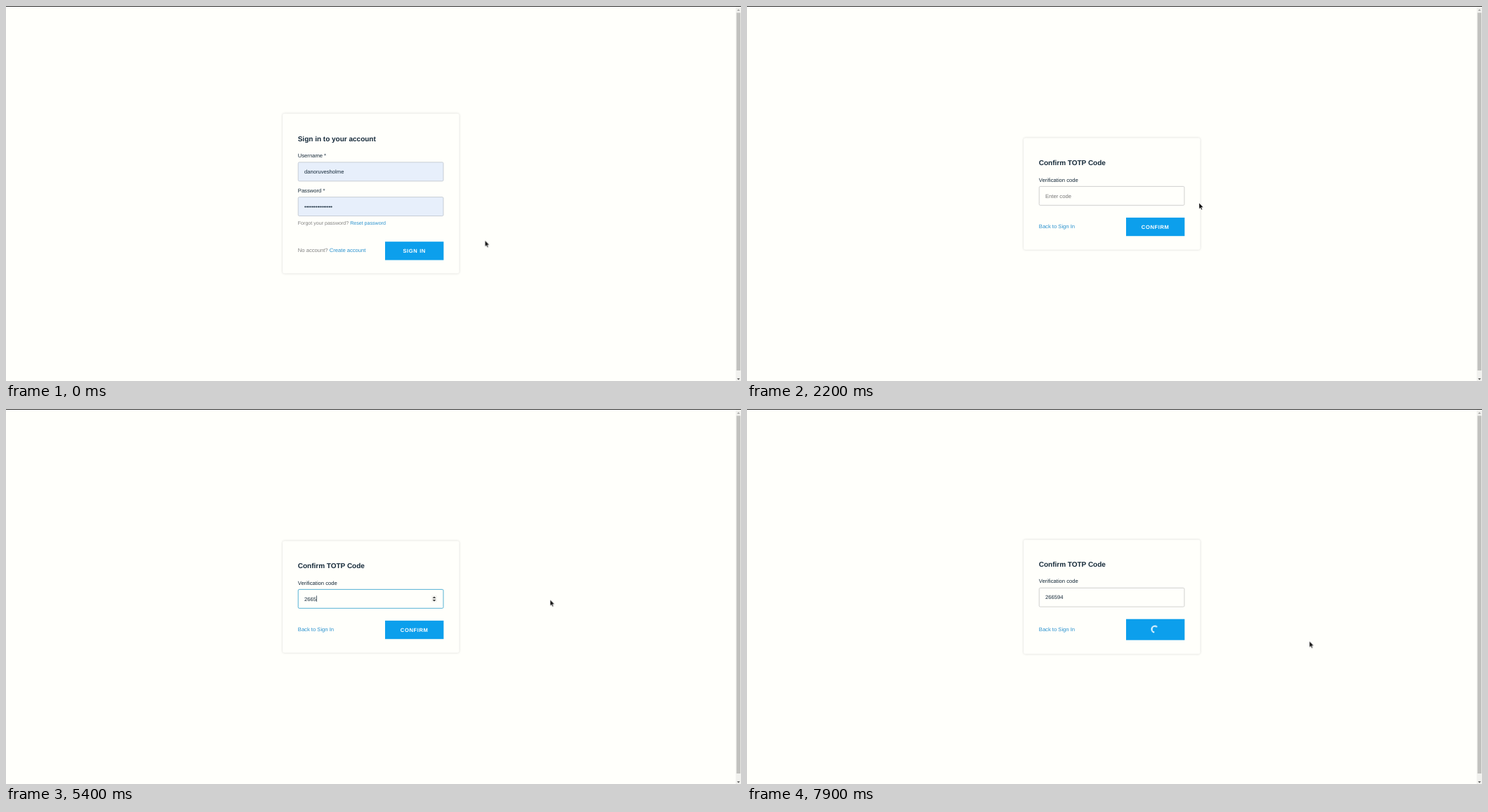
An HTML page that plays this animation: 1047 by 535 pixels, repeating every 8000 ms.

```html
<!DOCTYPE html>
<html lang="en">
<head>
<meta charset="utf-8">
<title>Two-step sign in</title>
<style>
  :root {
    --paper: #fffffb;
    --blue: #0c9fec;
    --hover: #3db2ef;
    --press: #4595cb;
  }
  html, body { margin: 0; width: 100%; height: 100%; overflow: hidden; background: var(--paper); }
  svg { display: block; width: 100vw; height: 100vh; }
  text {
    font: 7.64px "Liberation Sans", Arial, sans-serif;
    text-rendering: geometricPrecision;
    fill: #152939;
    white-space: pre;
  }
  .title { font-size: 10px; font-weight: bold; }
  .small { font-size: 7.09px; }
  .grey { fill: #828282; }
  .link { fill: #2b92ce; }
  .hint { fill: #757575; }
  .caps { font-weight: bold; letter-spacing: .6px; fill: #fff; }
  .card { fill: var(--paper); filter: drop-shadow(.55px .55px 1.6px rgba(0, 0, 0, .17)); }
  .field { fill: #e7effb; stroke: #bcc3cc; stroke-width: .8; }
  .button { fill: var(--blue); }
  .ring { fill: none; stroke: #fff; stroke-width: 1.9; }

  /* One tick of 100 ms is 1.25 % of the loop. */
  .act { animation: 8s step-end -20ms infinite; }
  .spin { animation: spin 1s steps(10) -20ms infinite; }
  @keyframes spin { to { transform: rotate(360deg); } }

  /* Sign-in form */
  .login { animation-name: login; }
  @keyframes login { 0% { opacity: 1; } 25% { opacity: 0; } }
  .login .card { animation-name: login-card; }
  @keyframes login-card { 0% { y: 153.6px; height: 228px; } 12.5% { y: 151.8px; height: 231.8px; } }
  .login .top { animation-name: login-top; }
  @keyframes login-top { 0% { transform: none; } 12.5% { transform: translateY(-2.1px); } }
  .login .button { animation-name: login-button; }
  @keyframes login-button {
    0% { fill: var(--blue); y: 336.2px; height: 26.3px; }
    5% { fill: var(--hover); y: 336.2px; height: 26.3px; }
    11.25% { fill: var(--press); y: 336.2px; height: 26.3px; }
    12.5% { fill: #9ad0f1; y: 334.2px; height: 30px; }
  }
  .login .caps { animation-name: login-idle; }
  @keyframes login-idle { 0% { opacity: 1; } 12.5% { opacity: 0; } }
  .login .busy { animation-name: login-busy; }
  @keyframes login-busy { 0% { opacity: 0; } 12.5% { opacity: 1; } }

  /* Code form */
  .code { animation-name: code; }
  @keyframes code { 0% { opacity: 0; } 25% { opacity: 1; } }
  .code .card { animation-name: code-card; }
  @keyframes code-card { 0% { y: 188.2px; height: 159.6px; } 93.75% { y: 186.4px; height: 163.2px; } }
  .code .top { animation-name: code-top; }
  @keyframes code-top { 0% { transform: none; } 93.75% { transform: translateY(-2.1px); } }
  .code .link { animation-name: code-link; }
  @keyframes code-link { 0% { transform: none; } 93.75% { transform: translateY(-.6px); } }
  .code .button { animation-name: code-button; }
  @keyframes code-button {
    0% { fill: var(--blue); y: 301.9px; height: 26.3px; }
    88.75% { fill: var(--hover); y: 301.9px; height: 26.3px; }
    92.5% { fill: var(--press); y: 301.9px; height: 26.3px; }
    93.75% { fill: var(--hover); y: 299.7px; height: 30px; }
    96.25% { fill: var(--blue); y: 299.7px; height: 30px; }
  }
  .code .caps { animation-name: code-idle; }
  @keyframes code-idle { 0% { opacity: 1; } 93.75% { opacity: 0; } }
  .code .busy { animation-name: code-busy; }
  @keyframes code-busy { 0% { opacity: 0; } 93.75% { opacity: 1; } }
  .code .field { fill: var(--paper); animation-name: focus; }
  @keyframes focus { 0%, 92.5% { stroke: #c4c4c4; } 37.5% { stroke: #2a9fcb; } }
  .steps { animation-name: steps; }
  @keyframes steps { 0%, 31.25%, 92.5% { opacity: 0; } 30%, 33.75% { opacity: 1; } }

  /* Typing: a cover with the caret on its left edge moves one digit at a time. */
  .cover { animation-name: type; }
  @keyframes type {
    0% { transform: none; }
    46.25% { transform: translateX(4.25px); }
    51.25% { transform: translateX(8.5px); }
    53.75% { transform: translateX(12.75px); }
    67.5% { transform: translateX(17px); }
    72.5% { transform: translateX(21.25px); }
    77.5% { transform: translateX(25.5px); }
  }
  .caret { fill: #152939; animation-name: caret; }
  @keyframes caret { 0%, 42.5%, 61.25%, 85% { opacity: 0; } 37.5%, 46.25%, 67.5% { opacity: 1; } }
  .hint { animation-name: hint; }
  @keyframes hint { 0% { opacity: 1; } 46.25% { opacity: 0; } }

  /* Pointer */
  .pointer { animation-name: move; }
  @keyframes move {
    0% { transform: translate(682.4px, 334.6px); }
    2.5% { transform: translate(674px, 337px); }
    3.75% { transform: translate(648px, 344px); }
    5% { transform: translate(620px, 350px); }
    6.25% { transform: translate(616px, 350px); }
    8.75% { transform: translate(604.5px, 343.4px); }
    11.25% { transform: translate(609.3px, 343.2px); }
    15% { transform: translate(640px, 331px); }
    16.25% { transform: translate(698px, 306px); }
    17.5% { transform: translate(690px, 295px); }
    18.75% { transform: translate(682.4px, 289.2px); }
    26.25% { transform: translate(666px, 285px); }
    27.5% { transform: translate(644px, 281px); }
    30% { transform: translate(609px, 269px); }
    31.25% { transform: translate(640px, 276px); }
    33.75% { transform: translate(588px, 271px); }
    35% { transform: translate(567px, 269px); }
    38.75% { transform: translate(690px, 271px); }
    40% { transform: translate(775.2px, 272.2px); }
    85% { transform: translate(762px, 277px); }
    86.25% { transform: translate(695px, 299px); }
    87.5% { transform: translate(628.3px, 312.6px); }
    88.75% { transform: translate(612px, 313px); }
    90% { transform: translate(600px, 313px); }
    96.25% { transform: translate(645px, 318px); }
    97.5% { transform: translate(745px, 327px); }
    98.75% { transform: translate(801.2px, 331.4px); }
  }
  .arrow { fill: #111; stroke: #fff; stroke-width: .4; animation-name: arrow; }
  @keyframes arrow { 0%, 12.5%, 38.75%, 96.25% { opacity: 1; } 5%, 33.75%, 88.75% { opacity: 0; } }
  .hand { fill: #fff; stroke: #222; stroke-width: .75; stroke-linejoin: round; animation-name: hand; }
  @keyframes hand { 0%, 12.5%, 96.25% { opacity: 0; } 5%, 88.75% { opacity: 1; } }
  .beam { fill: none; stroke: #333; stroke-width: .9; animation-name: beam; }
  @keyframes beam { 0%, 38.75% { opacity: 0; } 33.75% { opacity: 1; } }
</style>
</head>
<body>
<svg viewBox="0 0 1047 535">
  <rect width="1047" height="535" fill="#fffffb"/>

  <g class="login act">
    <rect class="card act" x="394" y="153.6" width="251.6" height="228" rx="3"/>
    <g class="top act">
      <text class="title" x="415.7" y="192.7">Sign in to your account</text>
      <text x="415.8" y="216.1">Username *</text>
      <rect class="field" x="416.2" y="222.9" width="206.8" height="26.9" rx="1.6"/>
      <text x="425" y="239.1">danoruvesholme</text>
      <text x="415.8" y="265.8">Password *</text>
      <rect class="field" x="416.2" y="272.6" width="206.8" height="26.9" rx="1.6"/>
      <text x="425" y="288.8">•••••••••••••••</text>
      <text class="small grey" x="415.8" y="311.9">Forgot your password? <tspan class="link">Reset password</tspan></text>
    </g>
    <text class="grey" x="415.8" y="351.2">No account? <tspan class="link">Create account</tspan></text>
    <rect class="button act" x="540" y="336.2" width="83.4" height="26.3"/>
    <text class="caps act" x="565.4" y="352.2">SIGN IN</text>
    <g class="busy act" transform="translate(581 348.6)">
      <circle class="ring" r="4.5" style="stroke:#62b8e8"/>
      <g class="spin"><circle class="ring" r="4.5" pathLength="360" stroke-dasharray="215 145" transform="rotate(-135)"/></g>
    </g>
  </g>

  <g class="code act">
    <rect class="card act" x="394" y="188.2" width="251.6" height="159.6" rx="3"/>
    <g class="top act">
      <text class="title" x="415.7" y="227.2">Confirm TOTP Code</text>
      <text x="415.8" y="250.6">Verification code</text>
      <rect class="field act" x="416.2" y="257.4" width="206.8" height="26.9" rx="1.6"/>
      <text x="425" y="273.6">266594</text>
      <g class="cover act">
        <rect x="425" y="264" width="30" height="13" fill="#fffffb"/>
        <rect class="caret act" x="425.2" y="266.3" width=".7" height="8.6"/>
      </g>
      <text class="hint act" x="425" y="273.6">Enter code</text>
      <g class="steps act">
        <rect x="606.3" y="266.2" width="7.4" height="9.2" fill="#f2f2ee"/>
        <path d="M607.6 270l2.4-2.6 2.4 2.6zM607.6 272l2.4 2.6 2.4-2.6z" fill="#3c3c3c"/>
      </g>
    </g>
    <text class="link act" x="415.8" y="317.3">Back to Sign In</text>
    <rect class="button act" x="540" y="301.9" width="83.4" height="26.3"/>
    <text class="caps act" x="561.8" y="317.8">CONFIRM</text>
    <g class="busy act" transform="translate(581 314.2)">
      <g class="spin"><circle class="ring" r="4.5" pathLength="360" stroke-dasharray="215 145" transform="rotate(136)"/></g>
    </g>
  </g>

  <!-- Window edge and scrollbar -->
  <rect width="1047" height="1" fill="#2e2e2e"/>
  <rect x="1039.6" y="1" width="7.4" height="534" fill="#f1f1ee"/>
  <rect x="1040.6" y="9.6" width="5.6" height="510.4" fill="#c1c1be"/>
  <path d="M1041.3 6.7l2.1-2.3 2.1 2.3z" fill="#a0a09e"/>
  <path d="M1041.3 531.2l2.1 2.3 2.1-2.3z" fill="#505050"/>

  <g class="pointer act">
    <path class="arrow act" d="M0 0V8.5L1.9 6.8 3.2 9.8 4.6 9.2 3.3 6.2H6z"/>
    <path class="hand act" d="M-.8 6V1.1a.8.8 0 0 1 1.6 0V3.8q.8-.6 1.4.1.8-.5 1.4.2 1-.3 1.2.8V7.1Q4.6 8.4 3.8 9.8H.3Q-.8 8-2.9 6q.3-1.3 2.1.3z"/>
    <path class="beam act" d="M-1.9-4.2Q0-4.2 0-3.4 0-4.2 1.9-4.2M0-3.6V3.6M-1.9 4.2Q0 4.2 0 3.4 0 4.2 1.9 4.2"/>
  </g>
</svg>
</body>
</html>
```
